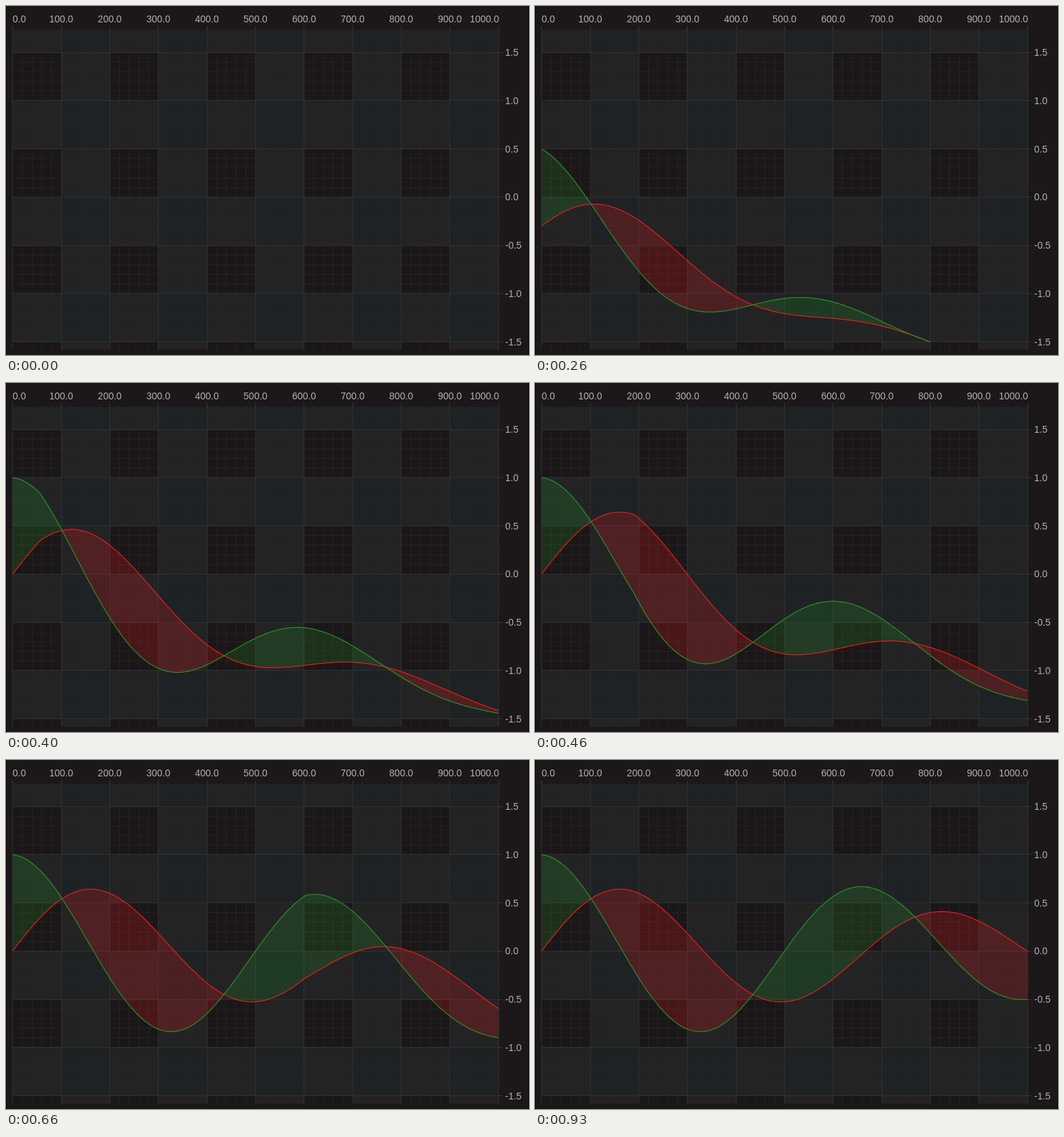
Write an HTML page with a canvas that moves like this. It is 768x512 px and loops after 1.33 s.

```html
<!DOCTYPE html>
<html lang="en">
<head>
<meta charset="utf-8">
<title>Wave chart</title>
<style>
html, body { margin: 0; width: 100%; height: 100%; overflow: hidden; background: #1c181a; }
canvas { display: block; }
</style>
</head>
<body>
<canvas id="chart" width="768" height="512"></canvas>
<script>
const ctx = document.getElementById('chart').getContext('2d');
const LOOP = 1330;
const LEFT = 9.7, RIGHT = 723, TOP = 35, BOTTOM = 504, ZERO = -1.5;
const GREEN = '#279b27', RED = '#ff1919';

const px = u => LEFT + u * (RIGHT - LEFT);
const py = v => 280.4 - 141.5 * v;

// How far the wave has run after each redraw; a point starts at u and settles at u + 1
const progress = [0, .375, .518, .66, .8, .93, 1.057, 1.19, 1.32, 1.46, 1.603, 1.735, 1.865, 1.98, 2];

const damp = u => 1 - u / 2;
const cosine = u => Math.cos(3 * Math.PI * u) * damp(u);
const sine = u => 0.7 * Math.sin(3 * Math.PI * u) * damp(u);

const crossing = k => (Math.atan(1 / 0.7) + k * Math.PI) / (3 * Math.PI);
const bounds = [0, crossing(0), crossing(1), crossing(2), 1];

function rect(x0, y0, x1, y1, color) {
  ctx.fillStyle = color;
  ctx.fillRect(x0, y0, x1 - x0, y1 - y0);
}

function hline(y, x0, x1, color) {
  y = Math.floor(y);
  rect(x0, y, x1, y + 1, color);
}

function vline(x, y0, y1, color) {
  x = Math.floor(x);
  rect(x, y0, x + 1, y1, color);
}

function drawCell(col, row) {
  const x0 = px(col / 10), x1 = px((col + 1) / 10);
  const rowTop = py(2 - row / 2), step = py(0) - py(0.1);
  const y0 = Math.max(TOP, rowTop), y1 = Math.min(BOTTOM, py(1.5 - row / 2));
  const evenCol = col % 2 === 0, oddRow = row % 2 === 1;
  const dark = evenCol && oddRow;
  rect(Math.floor(x0), Math.floor(y0), Math.floor(x1), Math.floor(y1),
    dark ? '#1b1718' : evenCol || oddRow ? '#232324' : '#1e2224');
  const minor = dark ? '#242123' : 'rgba(255,255,255,.006)';
  for (let i = 1; i < 5; i++) {
    vline(x0 + (x1 - x0) * i / 5, Math.floor(y0), Math.floor(y1), minor);
    const y = rowTop + step * i;
    if (y > TOP && y < BOTTOM) hline(y, Math.floor(x0), Math.floor(x1), minor);
  }
}

function drawAxes() {
  const grid = '#2f3132', tick = '#39393b', faint = '#29272a';
  for (let col = 0; col < 10; col++)
    for (let row = 0; row < 8; row++) drawCell(col, row);

  for (let i = 0; i <= 50; i++) {
    const x = px(i / 50), major = i % 5 === 0;
    vline(x, major ? 30 : 33, TOP, major ? tick : faint);
    if (major) vline(x, TOP, BOTTOM, grid);
  }
  for (let i = -15; i <= 17; i++) {
    const y = py(i / 10), major = i % 5 === 0;
    hline(y, RIGHT, RIGHT + (major ? 6 : 3), major ? tick : faint);
    if (major) hline(y, LEFT, RIGHT, grid);
  }

  ctx.font = '14px "Liberation Sans", Arial, sans-serif';
  ctx.fillStyle = '#b0b0b2';
  for (let i = 0; i <= 10; i++) {
    ctx.textAlign = i === 0 ? 'left' : i === 10 ? 'right' : 'center';
    ctx.fillText((i * 100).toFixed(1), i === 10 ? RIGHT + 1 : px(i / 10), 23.5);
  }
  ctx.textAlign = 'left';
  for (let v = -1.5; v <= 1.5; v += 0.5) ctx.fillText(v.toFixed(1), 733, py(v) + 5);
}

function drawBand(run) {
  const end = Math.min(1, run);
  const trace = (wave, from, to) => {
    const n = Math.max(1, Math.ceil(Math.abs(to - from) * 700));
    for (let i = 0; i <= n; i++) {
      const u = from + (to - from) * i / n;
      const grown = Math.max(0, Math.min(1, run - u));
      ctx.lineTo(px(u), py(ZERO + (wave(u) - ZERO) * grown));
    }
  };

  for (let k = 0; k < 4 && bounds[k] < end; k++) {
    const to = Math.min(end, bounds[k + 1]);
    ctx.beginPath();
    trace(cosine, bounds[k], to);
    trace(sine, to, bounds[k]);
    ctx.fillStyle = (k % 2 ? RED : GREEN) + '33';
    ctx.fill();
  }
  ctx.lineWidth = 1.1;
  for (const [wave, color] of [[sine, RED], [cosine, GREEN]]) {
    ctx.beginPath();
    trace(wave, 0, end);
    ctx.strokeStyle = color;
    ctx.stroke();
  }
}

function draw(now) {
  const t = now % LOOP;
  // 15 redraws per second, timed in whole hundredths
  const step = Math.ceil(3 * (Math.floor(t / 10) + 1) / 20) - 1;
  const run = progress[Math.min(step, progress.length - 1)];
  rect(0, 0, 768, 512, '#1c181a');
  rect(0, 0, 1, 512, '#000');
  rect(767, 0, 768, 512, '#000');
  drawAxes();
  if (run > 0) drawBand(run);
}

const start = performance.now();
function tick() {
  draw(performance.now() - start);
  requestAnimationFrame(tick);
}
tick();
</script>
</body>
</html>
```
